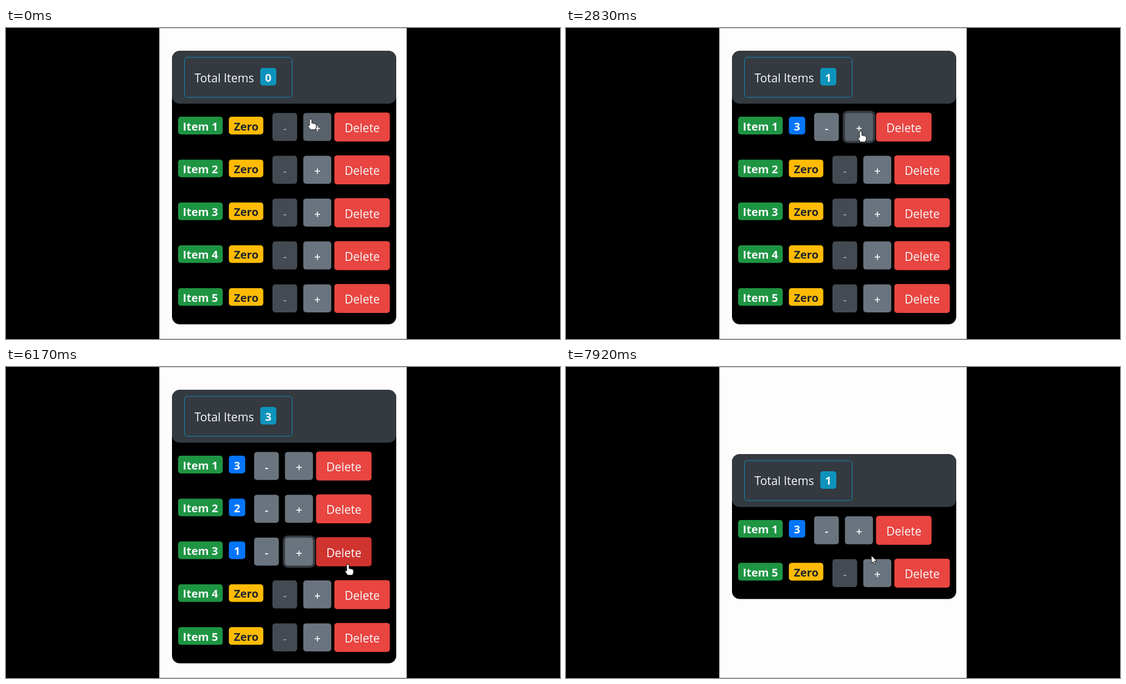
Write an HTML page that moves like this. It is 998 px wide and 561 px high and loops after 8 s.

```html
<!DOCTYPE html>
<html lang="en">
<head>
<meta charset="utf-8">
<title>Item counters</title>
<style>
  html, body { margin: 0; width: 100%; height: 100%; overflow: hidden; background: #000; }
  svg { display: block; width: 100%; height: 100%; }
  text { font: 21px "Open Sans", "Noto Sans", sans-serif; fill: #f8f9fa; text-anchor: middle; }
  .bold { font-size: 20px; font-weight: 700; }
  .sign { font-size: 20px; font-weight: 600; }
  .start { text-anchor: start; }
  .dark { fill: #212529; }
  .faint { fill: #969997; }
</style>
</head>
<body>
<svg id="stage" viewBox="0 0 998 561"></svg>
<script>
const LOOP = 8000, STEP = LOOP / 96;
const ITEMS = 5, PITCH = 77.3;
const GLIDE = 350, REST = 330, PRESS = 90, FADE = 150, HOVER_LAG = 90;
const stage = document.getElementById('stage');

// Pointer stops; those with a button click it at the given time
const stops = [
  { time: 0, x: 549, y: 166 },
  { time: 750, x: 549, y: 180, button: 'plus', id: 1 },
  { time: 1500, x: 525, y: 188, button: 'plus', id: 1 },
  { time: 2250, x: 531, y: 188, button: 'plus', id: 1 },
  { time: 3580, x: 549, y: 260, button: 'plus', id: 2 },
  { time: 4330, x: 528, y: 264, button: 'plus', id: 2 },
  { time: 5170, x: 549, y: 325, button: 'plus', id: 3 },
  { time: 6250, x: 616, y: 358, button: 'delete', id: 3 },
  { time: 6910, x: 622, y: 304, button: 'delete', id: 2 },
  { time: 7750, x: 624, y: 330, button: 'delete', id: 4 },
  { time: LOOP + 250, x: 550, y: 340 }
];
const clicks = stops.filter(stop => stop.button);

const clamp = u => Math.min(1, Math.max(0, u));
const smooth = u => u * u * (3 - 2 * u);
const mix = (a, b, u) => a + (b - a) * u;

const rect = (x, y, w, h, fill, r = 5, stroke = 'none') =>
  `<rect x="${x}" y="${y}" width="${w}" height="${h}" rx="${r}" fill="${fill}" stroke="${stroke}"/>`;
const text = (x, y, str, cls = '') => `<text x="${x}" y="${y}" class="${cls}">${str}</text>`;

function layoutAt(t) {
  const counts = new Map(Array.from({ length: ITEMS }, (_, i) => [i + 1, 0]));
  for (const { time, button, id } of clicks) {
    if (time > t) break;
    if (button === 'plus') counts.set(id, counts.get(id) + 1);
    else counts.delete(id);
  }
  const top = 41.3 + (ITEMS - counts.size) * PITCH / 2;
  const rows = [...counts].map(([id, count], i) =>
    ({ id, count, y: top + 111.2 + i * PITCH, shift: count ? -33 : 0 }));
  return { rows, top };
}

// The pointer glides to each stop, then rests a moment before the click
function pointerAt(t) {
  let { x, y } = stops[0];
  for (let i = 1; i < stops.length; i++) {
    const arrive = stops[i].time - REST;
    const leave = Math.max(stops[i - 1].time, arrive - GLIDE);
    const u = smooth(clamp((t - leave) / Math.max(1, arrive - leave)));
    x = mix(x, stops[i].x, u);
    y = mix(y, stops[i].y, u);
  }
  return [x, y];
}

// Name of the enabled button under the pointer, such as "plus2"
function hitAt(t) {
  const [x, y] = pointerAt(t);
  for (const { id, count, y: top, shift } of layoutAt(t).rows) {
    const dx = x - shift;
    if (y < top || y > top + 52) continue;
    if (dx > 480 && dx < 524.5 && count) return 'minus' + id;
    if (dx > 535.5 && dx < 586) return 'plus' + id;
    if (dx > 591.5 && dx < 692) return 'delete' + id;
  }
  return '';
}

// Pressing a button moves the focus; its ring grows in and fades out
function focusAt(t) {
  const last = clicks.findLastIndex(click => click.time - PRESS <= t);
  const now = clicks[last], before = clicks[last - 1];
  const u = now ? clamp((t - now.time + PRESS) / FADE) : 0;
  const nameOf = click => click ? click.button + click.id : '';
  const name = nameOf(now), old = nameOf(before);
  return { name, ring: key => key === name ? (key === old ? 4 : 4 * u) : key === old ? 4 * (1 - u) : 0 };
}

function drawRow({ id, count, y, shift }, hover, focus) {
  const lit = button => [hover, focus.name].includes(button + id);
  const gray = button => lit(button) ? '#59626a' : '#69747e';
  const ring = focus.ring('plus' + id);
  const badge = count
    ? rect(401.5, y + 7.6, 29.5, 31.8, '#0375fd') + text(416.3, y + 32, count, 'bold')
    : rect(401.5, y + 7.6, 62, 31.8, '#ffbb05') + text(432.7, y + 32, 'Zero', 'bold dark');
  return rect(310, y + 7.6, 80.5, 31.8, '#1e9543') + text(350.3, y + 32, 'Item ' + id, 'bold') + badge +
    `<g transform="translate(${shift} 0)">` +
    (ring ? rect(535.5 - ring, y + .7 - ring, 50.5 + 2 * ring, 50.5 + 2 * ring, '#343a40', 5 + ring) : '') +
    rect(480, y + .7, 44.5, 50.5, count ? gray('minus') : '#444a52') +
    text(502.5, y + 35, '-', count ? 'sign' : 'sign faint') +
    rect(535.5, y + .7, 50.5, 50.5, gray('plus')) + text(561, y + 35.5, '+', 'sign') +
    rect(591.5, y, 100, 52.3, lit('delete') ? '#cf342f' : '#e94541') +
    text(641.7, y + 35.5, 'Delete') + '</g>';
}

function drawPointer(t) {
  const hand = 'M-2.2 0Q-2-2 0-2T2 0V6Q4 4.6 5 6.4Q7 5.4 7.8 7.2Q10 6.6 10 9V13L8 17.5H-.5' +
    'L-4.8 11.5Q-5.5 9-3.6 9L-2.2 10.4Z';
  const arrow = 'M0 0V14L3.2 11 5.4 16 7.6 15 5.5 10.2H10Z';
  return `<path transform="translate(${pointerAt(t)})" d="${hitAt(t) ? hand : arrow}"
    fill="#fff" stroke="#111" stroke-linejoin="round"/>`;
}

function draw(t) {
  const { rows, top } = layoutAt(t);
  const hover = hitAt(Math.max(0, t - HOVER_LAG)), focus = focusAt(t);
  const total = rows.filter(row => row.count).length;
  stage.innerHTML =
    rect(276.5, .5, 445, 560, '#fdfdfd', 0, '#c4c4c4') +
    rect(299, top, 404, rows.length * PITCH + 106.7, '#000', 14) +
    rect(299, top, 404, 95.3, '#343a40', 14) +
    rect(321.5, top + 11.7, 194, 72, 'none', 5, '#118fbd') +
    text(339.5, top + 56.2, 'Total Items', 'start') +
    rect(458, top + 30.7, 29, 31.8, '#0d94bc') + text(472.5, top + 55.2, total, 'bold') +
    rows.map(row => drawRow(row, hover, focus)).join('') + drawPointer(t);
}

let shown = -1;
function tick() {
  const step = Math.floor((performance.now() % LOOP + 5) / STEP) % 96;
  if (step !== shown) draw((shown = step) * STEP);
  requestAnimationFrame(tick);
}
tick();
</script>
</body>
</html>
```
